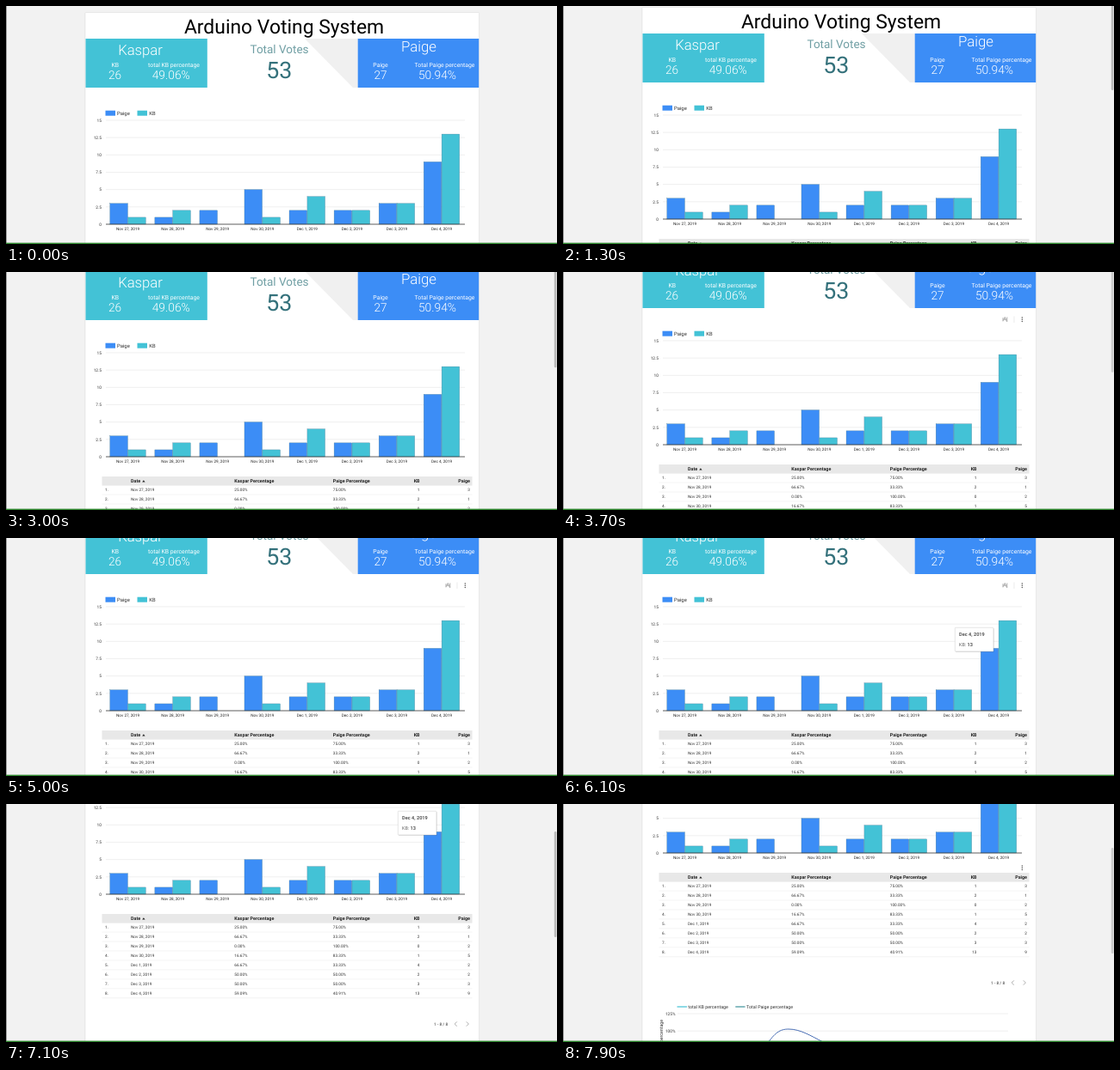
An HTML page for the animation above (8 s loop, 640 by 277 pixels).

```html
<!DOCTYPE html>
<html lang="en">
<head>
<meta charset="utf-8">
<title>Arduino Voting System</title>
<style>
html, body { margin: 0; width: 100%; height: 100%; overflow: hidden; background: #f2f2f2; }
svg { display: block; width: 640px; height: 277px; font-family: Roboto, sans-serif; text-rendering: geometricPrecision; }
</style>
</head>
<body>
<svg id="stage" viewBox="0 0 640 277" xmlns="http://www.w3.org/2000/svg"></svg>
<script>
const NS = 'http://www.w3.org/2000/svg';
const stage = document.getElementById('stage');
const BLUE = '#3c8df6', TEAL = '#43c2d6';
const A = 'Kaspar', B = 'Paige', AB = 'KB';
const DAYS = ['Nov 27', 'Nov 28', 'Nov 29', 'Nov 30', 'Dec 1', 'Dec 2', 'Dec 3', 'Dec 4'].map(d => d + ', 2019');
const VOTES_B = [3, 1, 2, 5, 2, 2, 3, 9];
const VOTES_A = [1, 2, 0, 1, 4, 2, 3, 13];

function add(parent, tag, attrs) {
  const el = document.createElementNS(NS, tag);
  for (const k in attrs) el.setAttribute(k, attrs[k]);
  parent.appendChild(el);
  return el;
}
const group = (parent = page) => add(parent, 'g', {});
const rect = (g, x, y, width, height, fill, more) => add(g, 'rect', { x, y, width, height, fill, ...more });
const line = (g, x1, y1, x2, y2, stroke, w = 0.6) => add(g, 'line', { x1, y1, x2, y2, stroke, 'stroke-width': w });
const path = (g, d, stroke, w = 1) => add(g, 'path', { d, stroke, 'stroke-width': w, fill: 'none' });

function text(g, str, x, y, size, fill = '#333', anchor = 'start', weight = 400) {
  const el = add(g, 'text', { x, y, fill, 'font-size': size, 'text-anchor': anchor, 'font-weight': weight });
  el.textContent = str;
  return el;
}

function dots(g, x, y) {
  for (const d of [-2.2, 0, 2.2]) add(g, 'circle', { cx: x, cy: y + d, r: 0.75, fill: '#555' });
}

rect(stage, 0, 0, 640, 277, '#f2f2f2');
const page = group(stage);

function drawHeader() {
  rect(page, 91.5, 7.5, 458.5, 800, '#e0e0e0', { rx: 1 });
  rect(page, 92.3, 8, 457, 800, '#fff');
  text(page, 'Arduino Voting System', 323, 32, 22.9, '#000', 'middle');
  add(page, 'path', { d: 'M347 38H409V95H403Z', fill: '#f0f0f0' });
  rect(page, 92.5, 38, 141.3, 57, TEAL);
  rect(page, 408.7, 38, 140.5, 57, BLUE);
  const white = (s, x, y, size, w) => text(page, s, x, y, size, '#fff', 'middle', w);
  white(A, 156, 56.5, 16.7, 300);
  white(B, 479.5, 53, 16.8, 300);
  white(AB, 126.7, 71.2, 6.9, 400);
  white('total ' + AB + ' percentage', 195, 71.2, 6.85, 400);
  white('26', 126.5, 84.8, 13.6, 300);
  white('49.06%', 191.7, 84.8, 13.8, 300);
  white(B, 435, 71.2, 6.9, 400);
  white('Total ' + B + ' percentage', 509.5, 71.2, 6.85, 400);
  white('27', 435, 84.8, 13.6, 300);
  white('50.94%', 501, 84.8, 13.8, 300);
  text(page, 'Total Votes', 317.5, 54.8, 13.5, '#709fa4', 'middle');
  text(page, '53', 317.3, 83.7, 26.8, '#34717b', 'middle');
}

function drawBars() {
  const base = 254, unit = 8.07;
  rect(page, 115.5, 121.7, 11.5, 6, BLUE);
  text(page, B, 129, 126.8, 5.9);
  rect(page, 152.5, 121.7, 11.5, 6, TEAL);
  text(page, AB, 166.3, 126.8, 5.9);
  for (let v = 0; v <= 15; v += 2.5) {
    const y = base - v * unit;
    if (v) line(page, 116, y, 533, y, '#e4e4e4');
    text(page, v, 111, y + 1.7, 4.8, '#333', 'end');
  }
  const bar = (x, v, fill) => {
    if (v) rect(page, x, base - v * unit, 20.6, v * unit, fill, { stroke: '#4a7f9a', 'stroke-width': 0.35 });
  };
  DAYS.forEach((d, i) => {
    const x = 120.8 + 52.06 * i;
    bar(x, VOTES_B[i], BLUE);
    bar(x + 20.9, VOTES_A[i], TEAL);
    text(page, d, x + 20.8, 260.5, 4.65, '#222', 'middle');
  });
  line(page, 116, base, 533, base, '#333', 0.8);
}

function drawTable() {
  const cols = [[115, 'start'], [145, 'start'], [265.3, 'start'], [379.8, 'start'], [480.5, 'end'], [539, 'end']];
  const row = (cells, y, size, fill, weight) => cells.forEach((c, i) =>
    text(page, c, cols[i][0], y, size, fill, cols[i][1], weight));
  rect(page, 111.5, 277, 430, 10.6, '#e8e8e8');
  row(['', 'Date', A + ' Percentage', B + ' Percentage', AB, B], 284.3, 5.4, '#222', 700);
  add(page, 'path', { d: 'M158.2 283.4l1.7-2.2 1.7 2.2z', fill: '#222' });
  DAYS.forEach((d, i) => {
    const y = 292.6 + 10.95 * i, a = VOTES_A[i], b = VOTES_B[i];
    const pct = v => (100 * v / (a + b)).toFixed(2) + '%';
    row([i + 1 + '.', d, pct(a), pct(b), a, b], y + 1.7, 4.7, '#333', 400);
    line(page, 111.5, y + 5.5, 541.5, y + 5.5, '#ececec');
  });
  text(page, '1 - 8 / 8', 497, 406.8, 4.8);
  path(page, 'M523.8 402.4l-2.6 2.6 2.6 2.6', '#999', 0.8);
  path(page, 'M534.8 402.4l2.6 2.6-2.6 2.6', '#999', 0.8);
}

function drawCurve() {
  line(page, 132.5, 433, 144, 433, TEAL, 1.2);
  text(page, 'total ' + AB + ' percentage', 145.2, 434.8, 5.35);
  line(page, 200.3, 433, 211.5, 433, '#3d929c', 1.2);
  text(page, 'Total ' + B + ' percentage', 213, 434.8, 5.3);
  for (const [label, y] of [['125%', 441], ['100%', 461.2]]) {
    line(page, 133, y, 517, y, '#e4e4e4');
    text(page, label, 130.5, y + 1.7, 4.8, '#333', 'end');
  }
  const axis = text(page, 'percentage', 0, 0, 5.3);
  axis.setAttribute('transform', 'translate(115.8 474.3) rotate(-90)');
  path(page, 'M236 478C246 463 252 459 262 459C276 459 288 467 302 474', '#4a6fb5', 1);
}

function drawTools() {
  const g = group();
  path(g, 'M511.5 109.5l1.8-4 1.8 4M512.2 108.2h2.3M515.8 105.5v5.2l-1.2-1.2M511 106.2v4.2', '#777', 0.6);
  line(g, 524, 104.5, 524, 112, '#ddd');
  dots(g, 533.3, 108.2);
  return g;
}

function drawTip() {
  const g = group();
  rect(g, 455.8, 158, 45, 28, '#000', { opacity: 0.12, rx: 1 });
  rect(g, 455.3, 157.3, 44.6, 27.6, '#fff', { stroke: '#ccc', 'stroke-width': 0.5, rx: 0.5 });
  text(g, 'Dec 4, 2019', 460, 167.2, 5.6, '#555', 'start', 700);
  text(g, AB + ':', 460, 179, 5.5, '#666');
  text(g, '13', 469.6, 179, 5.6, '#555', 'start', 700);
  return g;
}

drawHeader();
drawBars();
drawTable();
drawCurve();
const tools = drawTools();
const tip = drawTip();
const menu = group();
dots(menu, 533.3, 271.3);

const thumb = rect(stage, 636.8, 0, 2.7, 123, '#b9b9b9', { rx: 1.3 });
rect(stage, 0, 0, 0.7, 277, '#777');
rect(stage, 0, 275.6, 640, 1.4, '#2b842b');

const LOOP = 8000, STEP = 100;
const part = (t, from, to) => Math.min(1, Math.max(0, (t - from) / (to - from)));
const smooth = u => u * u * (3 - 2 * u);
const show = (el, on) => el.setAttribute('visibility', on ? 'visible' : 'hidden');

function scrollAt(t) {
  const nudge = 6 * Math.sin(Math.PI * part(t, 800, 1700));
  const first = 53 * smooth(part(t, 2400, 3300));
  const second = 144 * smooth(Math.pow(part(t, 6500, 7400), 1.21));
  return Math.round(nudge + first + second);
}

function thumbAlpha(t) {
  if (t < 900) return 0;
  if (t < 2400) return 1 - part(t, 2100, 2400);
  if (t < 2500) return 0;
  if (t < 6600) return 1 - part(t, 3600, 3900);
  return 1 - 0.3 * part(t, 7800, 7900);
}

function draw(ms) {
  const t = Math.floor((ms % LOOP) / STEP) * STEP;
  const s = scrollAt(t);
  page.setAttribute('transform', `translate(0 ${-s})`);
  thumb.setAttribute('y', 95.7 + 0.398 * s - 123);
  thumb.setAttribute('opacity', thumbAlpha(t));
  show(tools, t >= 3400 && t < 7200);
  show(tip, t >= 5700 && t < 7300);
  show(menu, t >= 7400);
}

const start = performance.now();
function tick() {
  draw(performance.now() - start);
  requestAnimationFrame(tick);
}
tick();
</script>
</body>
</html>
```
